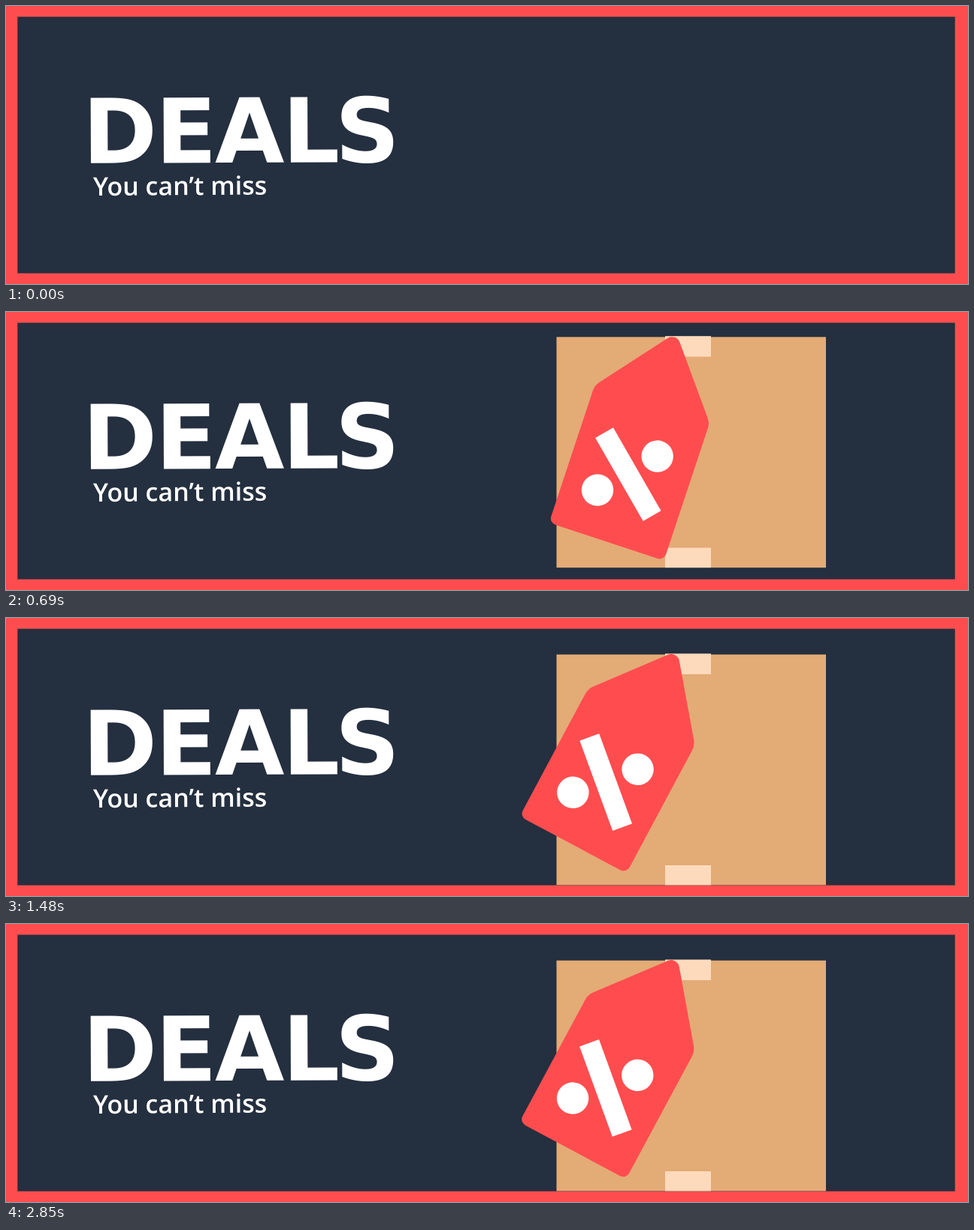
Animation, 1280 px wide and 371 px high, one loop 2890 ms. Source, as an HTML page:

```html
<!DOCTYPE html>
<html lang="en">
<head>
<meta charset="utf-8">
<title>Deals banner</title>
<style>
  html, body { margin: 0; width: 100%; height: 100%; overflow: hidden; background: #ff4d4f; }
  svg { display: block; width: 100%; height: 100%; }
  text { fill: #fff; }
  #title { font: 700 119.5px "DejaVu Sans", "Open Sans", sans-serif; }
  #sub { font: 600 34px "Open Sans", "Noto Sans", sans-serif; }
</style>
</head>
<body>
<svg viewBox="0 0 1280 371">
  <defs>
    <clipPath id="inner"><rect x="15.3" y="14.4" width="1247.4" height="342.3"/></clipPath>
  </defs>
  <rect width="1280" height="371" fill="#ff4d4f"/>
  <rect x="15.3" y="14.4" width="1247.4" height="342.3" fill="#242f3f"/>
  <text id="title" y="209.8" transform="rotate(-.25 115 209)">DEALS</text>
  <text id="sub" x="116" y="253" transform="rotate(-.35 116 253)">You can’t miss</text>
  <g clip-path="url(#inner)">
    <g id="parcel" visibility="hidden">
      <rect x="732.5" y="48.7" width="358.5" height="307.8" fill="#e3ab76"/>
      <rect x="877" y="47.5" width="61" height="27.5" fill="#fedabc"/>
      <rect x="877" y="330" width="61" height="26.5" fill="#fedabc"/>
      <g id="tag">
        <path id="label" fill="#ff4d4f"/>
        <g fill="#fff">
          <circle cx="28" cy="154.5" r="21.2"/>
          <circle cx="-33.5" cy="222.3" r="21.2"/>
          <rect x="-64" y="-13.75" width="128" height="27.5" transform="translate(-1.3 189.6) rotate(41.9)"/>
        </g>
      </g>
    </g>
  </g>
</svg>
<script>
const LOOP = 2890, START = 310, STEP = 1000 / 24;
const PIVOT = "888.6 52.4";
const byId = id => document.getElementById(id);
const parcel = byId("parcel"), tag = byId("tag");

// Closed polygon with circular corners; each point is [x, y, radius].
function roundedPath(points) {
  const n = points.length;
  const parts = points.map(([x, y, r], i) => {
    const toward = ([px, py]) => {
      const len = Math.hypot(px - x, py - y);
      return [(px - x) / len, (py - y) / len];
    };
    const a = toward(points[(i + n - 1) % n]), b = toward(points[(i + 1) % n]);
    const half = Math.acos(a[0] * b[0] + a[1] * b[1]) / 2;
    const cut = r / Math.tan(half);
    const at = v => `${x + v[0] * cut} ${y + v[1] * cut}`;
    return `${i ? "L" : "M"}${at(a)} A${r} ${r} 0 0 1 ${at(b)}`;
  });
  return parts.join(" ") + "Z";
}

// Centre the ink of each title letter on its place.
function placeTitle() {
  const title = byId("title"), style = getComputedStyle(title);
  const ctx = document.createElement("canvas").getContext("2d");
  ctx.font = `${style.fontWeight} ${style.fontSize} ${style.fontFamily}`;
  const centres = [153.5, 240.5, 324, 409.5, 481];
  const xs = [...title.textContent].map((ch, i) => {
    const m = ctx.measureText(ch);
    return centres[i] - (m.actualBoundingBoxRight - m.actualBoundingBoxLeft) / 2;
  });
  title.setAttribute("x", xs.join(" "));
}

// Cubic Bezier easing with handles (x1, 0) and (x2, 1).
function ease(p, x1, x2) {
  let lo = 0, hi = 1;
  for (let i = 0; i < 24; i++) {
    const s = (lo + hi) / 2, q = 1 - s;
    const x = 3 * q * q * s * x1 + 3 * q * s * s * x2 + s * s * s;
    if (x < p) lo = s; else hi = s;
  }
  return lo * lo * (3 - 2 * lo);
}

const LAND = 562, HOP = 308, HOP_HEIGHT = 16;

// Free fall, then one low bounce.
function dropAt(t) {
  if (t < LAND) return -330 + 0.005186 * (t - START) ** 2;
  const u = Math.min((t - LAND) / HOP, 1);
  return -4 * HOP_HEIGHT * u * (1 - u);
}

function angleAt(t) {
  if (t < 570) return 45;
  if (t < 930) return 45 - 59.6 * ease((t - 570) / 360, 0.2, 0.4);
  if (t < 1920) return -14.6 + 54.6 * ease((t - 930) / 990, 0.37, 0.32);
  return 30 + 10 * Math.cos(Math.PI * (t - 1920) / 1670);
}

function draw(now) {
  const t = now % LOOP;
  parcel.setAttribute("visibility", t < START ? "hidden" : "visible");
  if (t >= START) {
    const tick = Math.floor(t / 10) * 10;
    const pose = START + STEP * Math.floor((tick + 4.9 - START) / STEP);
    parcel.setAttribute("transform", `translate(0 ${dropAt(pose)})`);
    tag.setAttribute("transform", `translate(${PIVOT}) rotate(${angleAt(pose)})`);
  }
}

byId("label").setAttribute("d", roundedPath([
  [0, -10, 11], [80, 90.5, 22], [80, 284, 9], [-81, 284, 9], [-81, 91, 22]
]));
placeTitle();

const begin = performance.now();
function loop() {
  draw(performance.now() - begin);
  requestAnimationFrame(loop);
}
loop();
</script>
</body>
</html>
```
